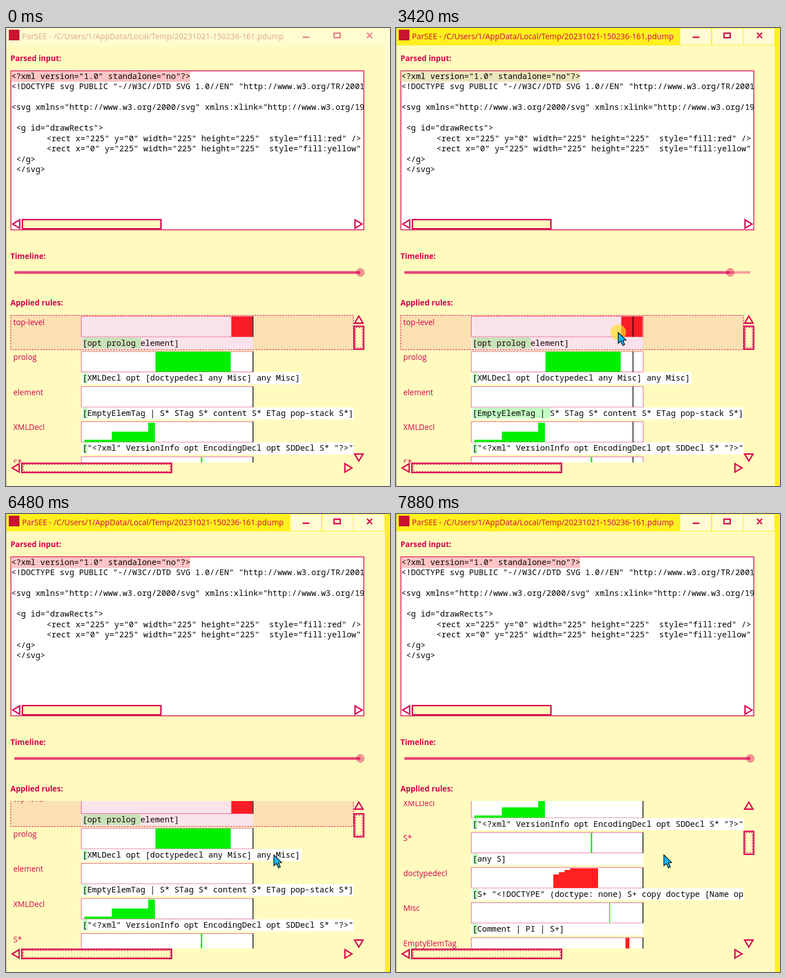
Recreate the animation shown at these times as an HTML page. Size 686x817 px, loop 8 s.

```html
<!DOCTYPE html>
<html lang="en">
<head>
<meta charset="utf-8">
<title>Parse viewer</title>
<style>
  html, body { margin: 0; width: 100%; height: 100%; overflow: hidden; background: #fffbbe; }
  svg { display: block; width: 686px; height: 817px; --ink: #d6004e; --pale: #fffbbe; }
  text { white-space: pre; }
  .ui { font: 13.95px "Open Sans", sans-serif; fill: var(--ink); }
  .head { font: 700 13.7px "Open Sans", sans-serif; fill: var(--ink); }
  .code { font: 14.42px "Noto Sans Mono", monospace; fill: #000; }
  .line { fill: none; stroke: var(--ink); stroke-width: 2.4; }
  .thumb { fill: var(--pale); stroke: var(--ink); stroke-width: 2.4; }
  .dash { fill: none; stroke: var(--ink); stroke-width: 1; stroke-dasharray: 3 2; }
  .selected { fill: rgba(214, 0, 78, .11); }
  .plot { fill: #fff; stroke: #e0609a; }
  .paper { fill: #fff; }
  .panel { fill: #fff; stroke: var(--ink); stroke-width: 1.4; }
  .ok { fill: #00f000; }
  .bad { fill: #ff2020; }
  .done { fill: #c4ffc4; }
  .bar, .edge { fill: #fffcd0; }
  .buttons { fill: none; }
  .caption { fill: #dfa58e; }
  .glyphs { opacity: .5; }
  .active .bar, .active .edge { fill: #fff01e; }
  .active .buttons { fill: #fffbd2; }
  .active .caption { fill: var(--ink); }
  .active .glyphs { opacity: 1; }
</style>
</head>
<body>
<svg id="stage" viewBox="0 0 686 817"></svg>
<script>
const LOOP = 8000, START = 1185, STEP = 202.5;
const PITCH = 62.6, CELL = 8.652, NOTCH = 16.4;

const esc = s => s.replace(/&/g, '&amp;').replace(/</g, '&lt;');
const rect = (x, y, w, h, cls, extra = '') =>
  `<rect x="${x}" y="${y}" width="${w}" height="${h}" class="${cls}" ${extra}/>`;
const text = (x, y, cls, s) => `<text x="${x}" y="${y}" class="${cls}">${esc(s)}</text>`;
const path = (d, cls, extra = '') => `<path d="${d}" class="${cls}" ${extra}/>`;
const arrow = (x, y, turn) =>
  path('M-7.5 6h15L0-6.5z', 'line', `transform="translate(${x} ${y}) rotate(${turn})"`);

// A tab is a little wider than seven cells.
const source = `<?xml version="1.0" standalone="no"?>
<!DOCTYPE svg PUBLIC "-//W3C//DTD SVG 1.0//EN" "http://www.w3.org/TR/2001/REC-SVG

<svg xmlns="http://www.w3.org/2000/svg" xmlns:xlink="http://www.w3.org/1999/xlink">

 <g id="drawRects">
\t<rect x="225" y="0" width="225" height="225"  style="fill:red" />
\t<rect x="0" y="225" width="225" height="225"  style="fill:yellow" />
 </g>
 </svg>`.split('\n');

const sourceLine = (s, i) =>
  text(s[0] === '\t' ? 72.5 : 9.5, 91 + i * 18.45, 'code', s.replace('\t', ''));

// A bar is [left, width, height].
const full = (x, w) => [[x, w, 36]];
const climb = Array.from({ length: 8 }, (_, i) => [281 + i * 10, 10, Math.min(35, 24 + 4 * i)]);

const rules = [
  ['top-level', '[opt prolog element]', 'bad', full(402.5, 38)],
  ['prolog', '[XMLDecl opt [doctypedecl any Misc] any Misc]', 'ok', full(267, 134.5)],
  ['element', '[EmptyElemTag | S* STag S* content S* ETag pop-stack S*]', 'ok', []],
  ['XMLDecl', '["<?xml" VersionInfo opt EncodingDecl opt SDDecl S* "?>"]', 'ok',
    [[140, 49, 4], [189, 65, 18.5], [254, 12, 34.5]]],
  ['S*', '[any S]', 'ok', full(348, 2.5)],
  ['doctypedecl', '[S+ "<!DOCTYPE" (doctype: none) S+ copy doctype [Name opt', 'bad', climb],
  ['Misc', '[Comment | PI | S+]', 'ok', full(381, 1.3)],
  ['EmptyElemTag', '[S* "<" Name any [S+ Attribute] S* "/>"]', 'bad', full(410, 7)]
];

const row = ([name, rule, cls, bars], i) =>
  `<g transform="translate(0 ${514.5 + i * PITCH})">`
  + text(13, 15, 'ui', name)
  + rect(134.5, 0, 307, 36.5, 'plot')
  + bars.map(([x, w, h]) => rect(x, 36.3 - h, w, h, cls)).join('')
  + rect(134.5, 37, Math.max(307, rule.length * CELL + 4), 21.5, 'paper')
  + rect(137, 37.5, CELL, 19, 'done', `id="done${i}"`)
  + text(136.5, 52, 'code', rule)
  + path('M0 0v36.5', 'now', 'stroke="#000" stroke-width="1.4"')
  + '</g>';

const stage = document.getElementById('stage');

stage.innerHTML = `
  <defs>
    <clipPath id="inputClip"><path d="M9 77H639V340H9z"/></clipPath>
    <clipPath id="listClip"><path d="M8 512H621V775H8z"/></clipPath>
  </defs>
  <rect width="686" height="817" fill="#fffbbe"/>`
  + rect(0, 0, 686, 31, 'bar') + rect(677, 0, 9, 817, 'edge')
  + [508, 565, 621].map(x => rect(x, 1, 55, 29, 'buttons')).join('')
  + rect(0, 0, 1, 817, '', 'fill="#b9b58c"')
  + rect(5, 3, 19, 19, '', 'fill="#c8142f"')
  + text(28.5, 19.5, 'ui caption', 'ParSEE - /C/Users/1/AppData/Local/Temp/20231021-150236-161.pdump')
  + path('M530 16.5h12M586 9.2h11v8h-11zM645 8.5l9 9.5M654 8.5l-9 9.5', 'line glyphs')
  + text(8, 59, 'head', 'Parsed input:')
  + text(8, 412, 'head', 'Timeline:')
  + text(8, 495, 'head', 'Applied rules:')

  + rect(8.7, 76.5, 630.6, 283.5, 'panel')
  + '<g clip-path="url(#inputClip)">'
  + rect(9, 77, 320, 19, '', 'id="match"') + source.map(sourceLine).join('')
  + '</g>'
  + arrow(18.5, 349.7, -90) + arrow(629.5, 349.7, 90)
  + rect(29.2, 341.8, 247.6, 16.4, 'thumb')

  + rect(15, 433.8, 618, 4.6, '', 'fill="#f2a29f"')
  + rect(15, 433.8, 618, 4.6, '', 'id="elapsed" fill="#e8457a"')
  + '<circle id="knob" cy="436" r="7.2" fill="#d6004e" fill-opacity=".4" stroke="#d6004e" stroke-opacity=".3"/>'

  + '<g clip-path="url(#listClip)"><g id="list">'
  + rules.map(row).join('')
  + rect(8.5, 512.5, 612, 61.5, 'dash selected')
  + '</g></g>'
  + arrow(630.3, 520.5, 0) + arrow(630.3, 766, 180)
  + '<g id="grip">' + rect(622, 532, 17, 41, 'thumb') + rect(624.5, 534.5, 12, 36, 'dash') + '</g>'
  + arrow(17.5, 784.7, -90) + arrow(611.5, 784.7, 90)
  + rect(28.2, 776.4, 267.6, 16.6, 'thumb') + rect(30.5, 778.5, 263, 12.5, 'dash')

  + `<g id="pointer">
      <circle id="press" r="14" fill="#ffe01e" fill-opacity=".65"/>
      <path d="M0 0V19.5L4.6 15.6L8.2 23.2L11.6 21.6L8.2 14.4L14 13.8z" fill="#10b8f8" stroke="#111" stroke-width="1.3"/>
    </g>`;

const $ = id => document.getElementById(id);
const set = (id, name, value) => $(id).setAttribute(name, value);
const show = (id, on) => { $(id).style.display = on ? '' : 'none'; };

// Key poses, counted in screen steps; the values between are linear.
const pointer = [
  [0, 637, 558], [4, 434, 541], [6, 434, 541], [11, 397, 543], [14, 352, 543],
  [17, 444, 542], [20, 457, 543], [21, 457, 543], [23, 478.5, 608]
];
const slider = [[6, 633], [11, 597], [14, 540], [17, 611.5], [20, 633]];
const wheel = [[25, 0], [26, 1], [30, 9], [32, 9], [33, 12]];

function along(keys, n) {
  const next = keys.findIndex(k => k[0] > n);
  if (next < 1) return keys.at(next).slice(1);
  const a = keys[next - 1], b = keys[next];
  const f = (n - a[0]) / (b[0] - a[0]);
  return a.slice(1).map((v, i) => v + (b[i + 1] - v) * f);
}

// Cells of the element rule that are matched when the time line stands at x.
const matched = x => x < 408 ? 1 : x < 427 ? 16 : 19;

function draw(t) {
  const n = Math.floor((t - START) / STEP);
  const [knob] = n < 6 ? [633] : along(slider, n);
  const [notches] = n < 25 ? [0] : along(wheel, n);
  const now = 134 + (knob - 15) * 307.3 / 618;
  const ended = knob >= 633;
  const y = notches * NOTCH;

  stage.classList.toggle('active', n >= 6);
  show('pointer', n >= 0);
  show('press', n >= 6 && n < 20);
  if (n >= 0) set('pointer', 'transform', `translate(${along(pointer, n)})`);

  set('knob', 'cx', knob);
  set('elapsed', 'width', knob - 15);
  set('match', 'fill', ended ? '#ffc4c4' : '#ece6bd');
  set('done0', 'width', CELL * 12);
  set('done2', 'width', CELL * (ended ? 1 : matched(now)));
  for (const line of document.querySelectorAll('.now'))
    line.setAttribute('transform', `translate(${now} 0)`);

  set('list', 'transform', `translate(0 ${-y})`);
  set('grip', 'transform', `translate(0 ${y * .173})`);
}

function tick() {
  draw(performance.now() % LOOP);
  requestAnimationFrame(tick);
}
tick();
</script>
</body>
</html>
```
